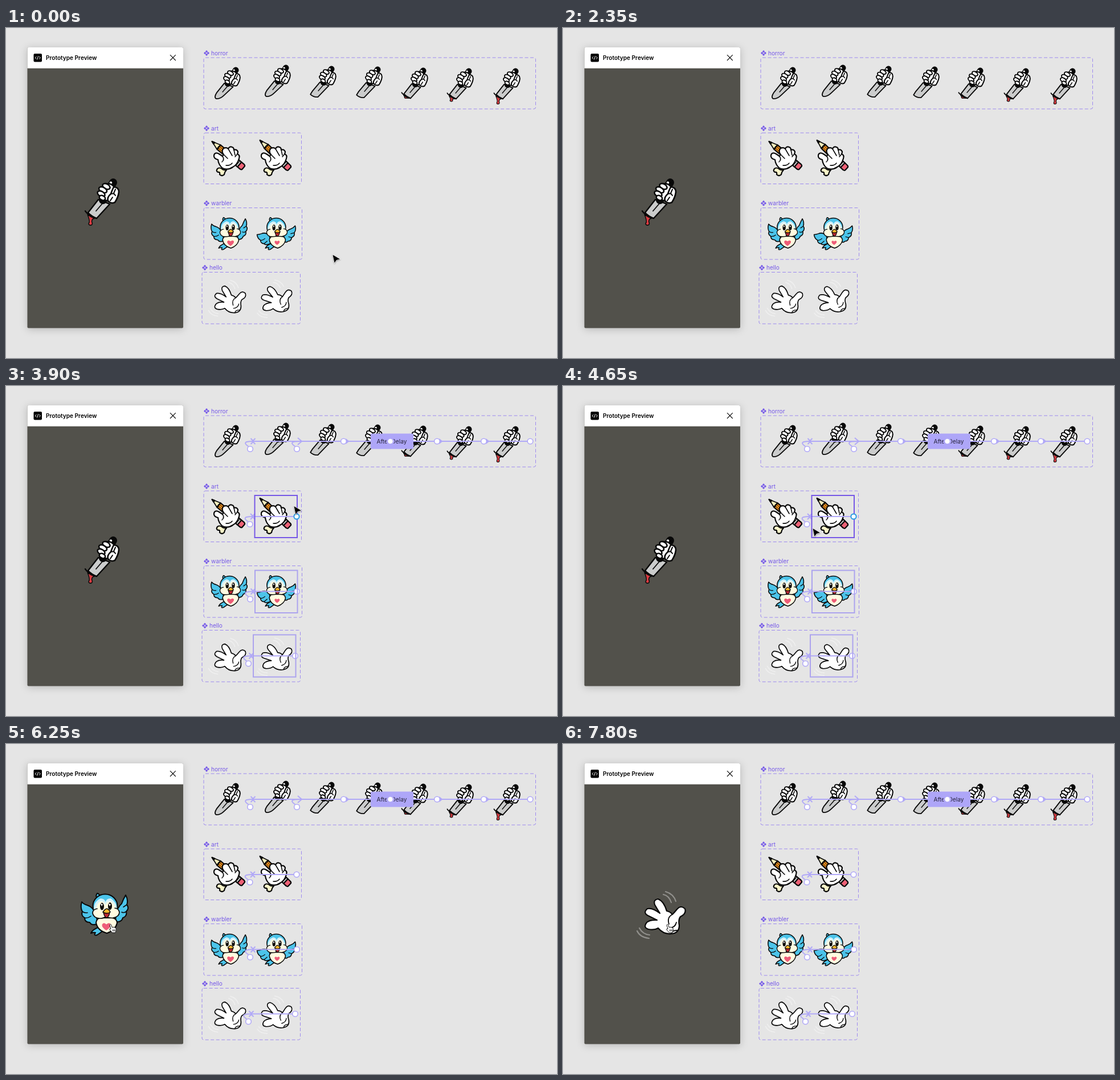
An HTML page that plays this animation: 967 by 579 pixels, repeating every 8 s.

```html
<!DOCTYPE html>
<html lang="en">
<head>
<meta charset="utf-8">
<title>Prototype Preview</title>
<style>
  html, body { margin: 0; width: 100%; height: 100%; overflow: hidden; background: #e5e5e5; }
  svg { display: block; width: 100%; height: 100%; }
  text { font: 10.1px Inter, sans-serif; }
  .title { font-weight: 600; }
  .window { filter: drop-shadow(0 2px 7px #0003); }
  .ink { stroke: #080808; stroke-linejoin: round; stroke-linecap: round; }
  .line { fill: none; }
  .noodle { fill: none; stroke: #b1a9f7; stroke-width: 2; }
  .port { fill: #fff; stroke: #b1a9f7; stroke-width: 1.6; }
</style>
</head>
<body>
<svg viewBox="0 0 967 579">
  <defs>
    <g id="fist" class="ink" fill="#fff" stroke-width="2.6">
      <path class="line" d="M188 271L170 302" stroke-width="14"/>
      <circle cx="184" cy="271.5" r="2.2" stroke="none"/>
      <path d="M174 274Q184 271 190 279Q194 287 187 295L178 303Q166 302 165 295Z"/>
      <path d="M189 279Q198 279 198 288Q197 297 191 306Q184 309 179 303Q177 297 184 291Q186 285 189 279Z"/>
      <path class="line" d="M184 291Q190 289 192 294M192 283L189 290M183 303L187 297" stroke-width="2"/>
      <ellipse cx="176" cy="278" rx="7" ry="4.4" transform="rotate(28 176 278)"/>
      <ellipse cx="170" cy="284" rx="7.5" ry="4.5" transform="rotate(28 170 284)"/>
      <ellipse cx="167" cy="291" rx="7" ry="4.4" transform="rotate(28 167 291)"/>
      <ellipse cx="169" cy="298" rx="5.5" ry="3.8" transform="rotate(28 169 298)"/>
    </g>

    <g id="art1" class="ink" fill="#fff" stroke-width="2.2">
      <path id="cuff" fill="#fbf6c9" d="M371 247Q368 251 372 253Q376 252 375 257Q379 261 383 257Q384 252 387 249Q381 250 379 247Q374 244 371 247Z"/>
      <g id="pencil" transform="translate(361.5 199) rotate(40)">
        <path fill="#f3edbb" d="M0 0L15-4.8V4.8Z" stroke-width="1.7"/>
        <path fill="#111" d="M0 0L5-1.6V1.6Z"/>
        <path fill="#f7941d" d="M15-4.8H60V4.8H15Q17 2 15 0Q17-2 15-4.8Z"/>
        <path class="line" d="M17-1.5H40M17 1.8H40" stroke-width=".9"/>
        <path fill="#e4e4e4" d="M56-5.5H63V5.5H56Z"/>
        <path class="line" d="M59.5-5.5V5.5" stroke-width="1.2"/>
        <path fill="#ee6176" d="M63-5.5H69Q72-5 72-3V3Q72 5 69 5.5H63Z"/>
      </g>
      <path id="grip" d="M380 246Q373 240 372 231Q364 229 365 223Q367 217 374 221L380 225L382 222Q377 216 382 211Q387 209 390 212Q392 207 397 209Q400 210 400 214Q405 212 407 217Q407 219 406 221Q411 223 409 229Q406 240 398 244Q390 250 380 246Z"/>
      <path id="creases" class="line" d="M382 222L389 229M390 212L397 224M400 214L402 223M380 225Q384 231 379 235M406 221L402 226M386 241Q393 242 397 237" stroke-width="1.6"/>
    </g>
    <g id="art2" class="ink" fill="#fff" stroke-width="2.2">
      <g transform="translate(1 0)"><use href="#cuff"/></g>
      <g transform="rotate(4 391.5 229)"><use href="#pencil"/></g>
      <g transform="translate(1 0)"><use href="#grip"/><use href="#creases"/></g>
    </g>

    <g id="birdBody" class="ink" stroke-width="2">
      <path fill="#4cc4ea" d="M164 321Q152 325 149 332Q154 330 157 331Q153 337 160 335Q166 331 170 328Z"/>
      <path fill="#4cc4ea" d="M164 272Q155 269 160 262Q164 262 166 271Z"/>
      <ellipse cx="174" cy="284" rx="21.5" ry="20.5" fill="#4cc4ea"/>
      <path fill="#fffbe0" d="M158 313Q160 304 168 305H185Q194 305 195 314Q192 327 177 332Q160 327 158 313Z"/>
      <path fill="#d4f2fa" stroke="none" d="M154 291Q154 276 166 271Q173 271 174.500 277Q177 270 184 271Q194 277 195 290Z"/>
      <path fill="#fffbe0" stroke="none" d="M158 292Q159 277 167 276Q173 277 174.500 283Q177 275 184 276Q191 279 192 292Z"/>
      <path fill="#fffbe0" stroke-width="1.700" d="M160 289Q152 290 152 297Q154 306 165 306Q171 306 175 303Q181 306 188 305Q199 303 199 295Q197 288 191 288"/>
      <path fill="#fffbe0" stroke="none" d="M159 291Q175 284 192 290L190 296H162Z"/>
      <g fill="#080808" stroke="none">
        <ellipse cx="168.500" cy="285" rx="3.500" ry="6.500"/>
        <ellipse cx="182.500" cy="284.500" rx="3.500" ry="6.500"/>
        <path fill="#fff" d="M166 280l4 1-2 4ZM180 280l4 1-2 4Z"/>
      </g>
      <path fill="#b82732" stroke-width="1.500" d="M171 295H182Q181 304 176 305Q172 302 171 295Z"/>
      <path fill="#f8b72d" stroke-width="1.500" d="M170 295Q174 289 177 289Q181 290 183 295Q177 299 170 295Z"/>
    </g>
    <path id="heart" fill="#ee5d78" d="M176 327Q168 322 168.500 317Q171 312 176 316.500Q182 312 184 317Q184 322 176 327Z"/>
    <g id="bird1">
      <g class="ink" fill="#4cc4ea" stroke-width="2">
        <path d="M158 299Q153 286 143 283Q136 281 133 277Q130 287 134 294Q131 301 138 305Q138 313 147 313Q151 320 161 315Z"/>
        <path d="M193 300Q195 287 203 280Q206 272 210 265Q215 274 212 282Q217 288 211 294Q213 302 205 305Q203 313 192 312Z"/>
        <path class="line" d="M134 294Q138 297 143 296M138 305Q144 306 149 302M212 282L206 286M211 294Q207 297 203 295" stroke-width="1.600"/>
      </g>
      <use href="#birdBody"/><use href="#heart"/>
    </g>
    <g id="bird2">
      <g class="ink" fill="#4cc4ea" stroke-width="2">
        <path d="M158 303Q149 295 140 299Q135 301 130 301Q131 310 138 314Q138 321 146 322Q150 327 162 321Z"/>
        <path d="M192 301Q199 290 207 288Q213 286 217 281Q220 290 215 297Q217 304 209 308Q208 316 201 316Q196 321 190 316Z"/>
        <path class="line" d="M138 314Q143 315 148 310M146 322L153 316M215 297L207 299M209 308L202 306" stroke-width="1.600"/>
      </g>
      <use href="#birdBody"/><use href="#heart" transform="translate(42 76) scale(.76)"/>
    </g>

    <g id="wave1" class="ink">
      <path class="line" style="stroke:#fff" stroke-opacity=".36" stroke-width="2.200" d="M176 264Q186 266 190 278M180 259Q194 263 198 276M130 328Q135 339 151 341M134 323Q140 334 152 335"/>
      <path fill="#fff" stroke-width="2.200" d="M182 293Q177 276 167 272Q158 273 161 282Q165 289 170 297Q157 287 148 289Q140 296 149 301L165 309Q153 308 147 313Q140 322 150 325Q160 327 167 323Q176 334 190 333Q204 332 204 318Q202 308 206 303Q217 298 214 289Q207 282 200 290Q196 295 192 299Q188 294 182 293Z"/>
      <path class="line" stroke-width="1.800" d="M192 299Q182 304 186 316M199 313Q197 322 187 323M190 333Q191 327 200 327"/>
    </g>
    <g id="wave2"><use href="#wave1" transform="rotate(-8 173.5 298.5)"/></g>
  </defs>

  <g class="window">
    <rect x="37.5" y="34" width="273.5" height="492.6" rx="2" fill="#52514b"/>
    <path d="M37.5 70.7V36Q37.5 34 39.5 34H309Q311 34 311 36V70.7Z" fill="#fff"/>
  </g>
  <rect x="48.5" y="45" width="14.5" height="14.5" rx="2" fill="#000"/>
  <path d="M53.5 50l-2.5 2.3 2.5 2.3M58 50l2.5 2.3-2.5 2.3M56.5 49.2l-1.5 6.2" fill="none" stroke="#fff"/>
  <text class="title" x="70" y="55.6">Prototype Preview</text>
  <path d="M288 47.2l9.8 9.8m0-9.8l-9.8 9.8" stroke="#111" stroke-width="1.2"/>

  <g id="board"></g>
  <g id="links"></g>
  <g id="hover" fill="none" stroke-width="2">
    <rect x="436.5" y="192" width="74.5" height="74" stroke="#7658e6"/>
    <rect x="437" y="323.5" width="74.5" height="74.5" stroke="#aca3ee"/>
    <rect x="434" y="436.5" width="74.5" height="74" stroke="#aca3ee"/>
    <circle cx="510" cy="229" r="4.6" fill="#fff" stroke="#2b9fe2"/>
  </g>
  <g id="preview"></g>
  <g id="cursor">
    <path id="arrow" d="M.5 0L3.5 14L7 9L13 7.500Z" fill="#000" stroke="#fff" stroke-width="1.2" paint-order="stroke" style="filter:drop-shadow(0 1px 1px #0006)"/>
    <path id="pointer" d="M-1 1.5Q.5-1 2 1.5L3 5.5Q7 4.5 10 7L10.5 11L9 15H3.5L-1.5 9.5Q-1.5 7.5 1 8.5ZM4.5 9.5v3M6.5 9.5v3M8.5 9.5v3" fill="#fff" stroke="#111"/>
  </g>
</svg>
<script>
const $ = id => document.getElementById(id);
const ZOOM = 1.3, CENTER = [173.5, 298.5], PENCIL_CENTER = [391.5, 229];

// Shift of the hand for each knife pose.
const knifePoses = [[1, -2], [7, -6], [5, -4], [4, -3], [2, -1], [0, 0], [0, 0]];
const blades = {
  round: "M162 301L145 322Q138 333 143 336Q152 338 162 328L182 309Z",
  worn: "M162 301L145 321L140 329Q147 336 157 335L182 309Z",
  cut: "M162 301L144 324Q151 331 159 334L182 309Z"
};

function knife(pose) {
  const [dx, dy] = knifePoses[pose];
  const end = pose < 2 ? "round" : pose < 4 ? "worn" : "cut";
  const drip = pose < 4 ? 0 : 1 + (pose - 4) * 6;
  const bottom = 333 + drip;
  const blood = drip ? `<path fill="#d93c42" stroke-width="1.5" d="M143 327Q150 333 156 334Q151 334 150.500 ${bottom - drip / 2}Q153 ${bottom - 1} 149 ${bottom}Q144 ${bottom} 145.500 ${bottom - 4}Q148 ${bottom - drip / 2} 143 327Z"/>` : "";
  const edge = end == "cut" ? '<path class="line" d="M139 321Q142 327 159 334"/>' : "";
  return `<g transform="translate(${dx * ZOOM} ${dy * ZOOM})"><g class="ink" stroke-width="2.4">${blood}
    <path fill="#cbcccc" d="${blades[end]}"/>${edge}
    <path class="line" d="M170 307L158 321" stroke-width="1.8"/></g><use href="#fist"/></g>`;
}

// Places artwork so that its own centre lands on (x, y).
function place(art, x, y, scale, [cx, cy] = CENTER) {
  return `<g transform="translate(${x} ${y}) scale(${scale}) translate(${-cx} ${-cy})">${art}</g>`;
}
const use = id => `<use href="#${id}"/>`;
const small = (art, x, y) => place(art, x, y, 1 / ZOOM);
const pencil = (id, x, y, scale) => place(use(id), x, y, scale, PENCIL_CENTER);

function frame(label, x, y, w, h) {
  const diamonds = [[0, -2.8], [2.8, 0], [0, 2.8], [-2.8, 0]]
    .map(([dx, dy]) => `M${x + 5 + dx} ${y - 10.2 + dy}l2.2 2.2-2.2 2.2-2.2-2.2Z`).join("");
  return `<path d="${diamonds}" fill="#7558e8"/><text x="${x + 13}" y="${y - 4.2}" fill="#7558e8">${label}</text>
    <rect x="${x}" y="${y}" width="${w}" height="${h}" rx="3" fill="none" stroke="#9c89ef" stroke-dasharray="6 3.5"/>`;
}

$("board").innerHTML =
  frame("horror", 347, 52, 582.5, 90) + frame("art", 347, 184, 171.5, 89.5) +
  frame("warbler", 347, 315.5, 172.5, 90.5) + frame("hello", 344, 428.5, 172.5, 90.5) +
  knifePoses.map((_, i) => small(knife(i), 391 + 82 * i, 97)).join("") +
  pencil("art1", 391.5, 229, 1) + pencil("art2", 473.5, 229, 1) +
  small(use("bird1"), 392, 360.5) + small(use("bird2"), 474, 360.5) +
  small(use("wave1"), 389, 473) + small(use("wave2"), 471, 473);

const port = (x, y) => `<circle class="port" cx="${x}" cy="${y}" r="4.8"/>`;
const noodle = d => `<path class="noodle" d="${d}"/>`;
const hook = (x, y) => noodle(`M${x - 3} ${y + 9}Q${x - 12} ${y + 3} ${x - 6} ${y + 1}Q${x - 2} ${y} ${x + 5} ${y}`) + port(x, y + 13.5);
const cross = (x, y) => noodle(`M${x} ${y - 5}l5 5-5 5M${x + 8} ${y - 5}l-5 5 5 5`);
const pair = (x, y) => noodle(`M${x + 4} ${y}H${x + 82}`) + hook(x, y) + cross(x + 1, y) + port(x + 82, y);
const tip = x => `<path d="M${x + 4} 92l6 5-6 5Z" fill="#b1a9f7"/>` + port(x, 97);

$("links").innerHTML =
  noodle("M433 97H920") + hook(428.5, 97) + cross(429.5, 97) + hook(510.5, 97) + noodle("M512 91l7 6-7 6") +
  [592.5, 756.5, 838.5].map(tip).join("") + port(920, 97) +
  `<rect x="640" y="83.5" width="75" height="27" rx="2" fill="#aea6f8"/>
   <text x="650.5" y="100.5" fill="#25223b">After Delay</text>
   <circle cx="674.5" cy="97" r="5.5" fill="#fff" stroke="#aea6f8" stroke-width="2.5"/>` +
  pair(428, 229) + pair(428.5, 360.5) + pair(425.5, 473.5);

const inWindow = art => `<g>${art}</g>`;
const shows = [
  [0, inWindow(knife(6))],
  [5150, pencil("art1", ...CENTER, ZOOM)],
  [5450, pencil("art2", ...CENTER, ZOOM)],
  [5900, inWindow(use("bird1"))],
  [6500, inWindow(use("bird2"))],
  [7000, inWindow(use("bird1"))],
  [7500, inWindow(use("wave1"))]
];
$("preview").innerHTML = shows.map(([, art]) => art).join("");
const stages = [...$("preview").children];

// time, x, y of the cursor tip
const path = [
  [0, 573, 398], [1550, 573, 398], [1900, 880, 120], [2950, 890, 140], [3450, 520, 222],
  [3650, 505, 211], [3950, 505, 211], [4450, 438, 250], [4650, 438, 250], [5000, 183, 316], [8000, 183, 316]
];
function cursorAt(t) {
  const i = path.findIndex(p => p[0] > t);
  const [t0, x0, y0] = path[i - 1], [t1, x1, y1] = path[i];
  const p = (t - t0) / (t1 - t0), e = p * p * (3 - 2 * p);
  return [x0 + (x1 - x0) * e, y0 + (y1 - y0) * e];
}

const show = (el, on) => el.style.display = on ? "" : "none";

function draw() {
  const t = Math.floor(performance.now() % 8000 / 50) * 50;
  const [x, y] = cursorAt(t);
  const inPreview = x < 311;
  $("cursor").setAttribute("transform", `translate(${x} ${y})`);
  show($("cursor"), t < 1900 || t >= 2950);
  show($("arrow"), !inPreview);
  show($("pointer"), inPreview);
  show($("links"), t >= 2450);
  show($("hover"), t >= 2950 && x > 436 && x < 511 && y > 192 && y < 266);
  const current = shows.findLastIndex(([start]) => t >= start);
  stages.forEach((el, i) => show(el, i === current));
  requestAnimationFrame(draw);
}
draw();
</script>
</body>
</html>
```
